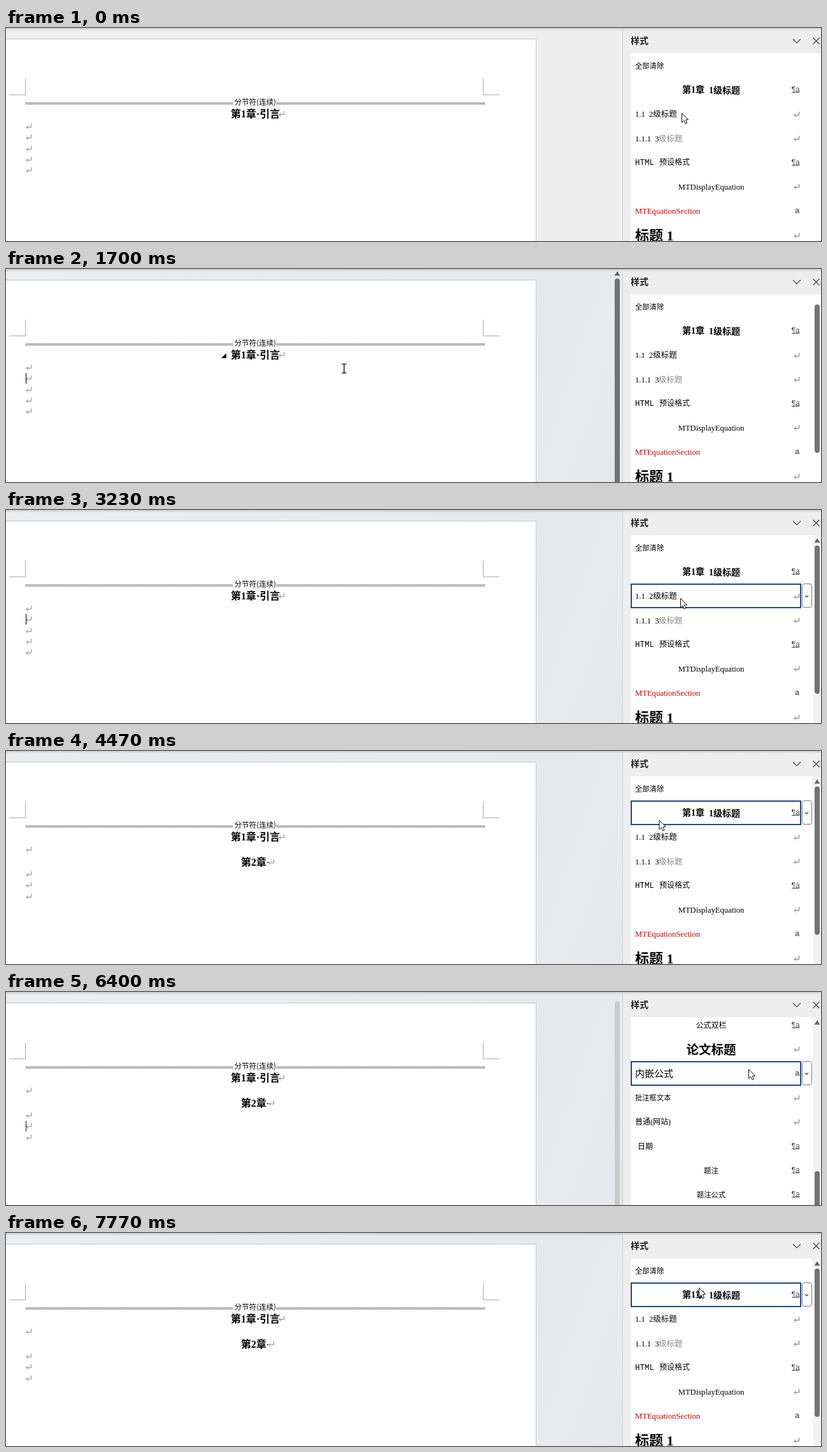
Write an HTML page with a canvas that moves like this. It is 1280 by 336 pixels and loops after 8 s.

```html
<!DOCTYPE html>
<html lang="zh">
<head>
<meta charset="utf-8">
<style>
html, body { margin: 0; width: 1280px; height: 336px; overflow: hidden; background: #eee; }
canvas { display: block; }
</style>
</head>
<body>
<canvas id="stage" width="1280" height="336"></canvas>
<script>
const g = document.getElementById('stage').getContext('2d');
const LOOP = 8000, ACTIVE = 700, APPLY = 4000, CLICK = 5570, JUMP = 5970;
const SERIF = '"Liberation Serif","Noto Sans CJK SC",serif';
const SANS = '"Liberation Sans","Noto Sans CJK SC",sans-serif';
const CJK = '"Noto Sans CJK SC",sans-serif';
const MONO = '"Liberation Mono",monospace';
const ROW = 38.2, FIRST = 59.4;

// Each key: time, then values.
const pointer = [
  [30, 1061, 134], [600, 530, 180], [830, 518, 190], [870, 518, 190], [1170, 505, 186],
  [1370, 505, 186], [1530, 1010, 170], [1700, 531, 157], [2000, 515, 166], [2200, 515, 166],
  [2900, 1085, 150], [3030, 1085, 150], [3230, 1059, 139], [3470, 1070, 100], [4370, 1070, 100],
  [4970, 481, 216], [6170, 481, 216], [6400, 1166, 121.5], [6800, 1117, 138.5], [7130, 1117, 138.5],
  [7770, 1088, 86]
];
const scrolling = [[6500, 542], [6970, 274], [7030, 274], [7130, 215], [7450, 0]];
const caretOn = [[700, 1100], [1600, 2300], [2650, 3400], [4000, 4480], [4700, 5260],
  [5590, 6230], [6330, 6700], [6980, 7300]];
const docHover = [[400, 1470], [1600, 2450], [4700, 6290]];
const paneHover = [[1460, 1615], [2450, 4640], [6290, 8400]];

// Style rows: text, size, marker, options.
const rows = [
  ['全部清除', 11.3, ''],
  ['', 14, 'pa'],
  ['1.1  2级标题', 12.5, 'ret'],
  ['', 12.5, 'ret'],
  ['', 12, 'pa'],
  ['MTDisplayEquation', 12.6, 'ret', { mid: 1 }],
  ['MTEquationSection', 12.6, 'a', { color: '#c80000' }],
  ['标题 1', 22, 'ret', { bold: 1 }],
  ['标题 2', 19.5, 'ret', { font: SANS }],
  ['标题 3', 20, 'ret', { bold: 1 }],
  ['标题 4', 17.6, 'ret', { font: SANS }],
  ['参考文献', 13, 'ret'],
  ['代码', 12, 'ret'],
  ['附录', 18, 'ret'],
  ['公式双栏', 12, 'pa', { mid: 1 }],
  ['论文标题', 19.5, 'ret', { mid: 1, bold: 1 }],
  ['内嵌公式', 15, 'a'],
  ['批注框文本', 11.3, 'ret'],
  ['普通(网站)', 12, 'ret'],
  ['日期', 12, 'pa', { x: 992 }],
  ['题注', 11.5, 'pa', { mid: 1 }],
  ['题注公式', 11.2, 'pa', { mid: 1 }],
  ['正文', 12, 'ret']
];

function at(keys, t) {
  if (t <= keys[0][0]) return keys[0].slice(1);
  for (let i = 1; i < keys.length; i++) {
    const a = keys[i - 1], b = keys[i];
    if (t < b[0]) {
      const u = (t - a[0]) / (b[0] - a[0]), e = u * u * (3 - 2 * u);
      return a.slice(1).map((v, k) => v + (b[k + 1] - v) * e);
    }
  }
  return keys[keys.length - 1].slice(1);
}

function rect(x, y, w, h, color) {
  g.fillStyle = color;
  g.fillRect(x, y, w, h);
}

function line(points, color, width = 1) {
  g.beginPath();
  points.forEach(([x, y]) => g.lineTo(x, y));
  g.strokeStyle = color;
  g.lineWidth = width;
  g.stroke();
}

function shape(points, fill, stroke) {
  g.beginPath();
  points.forEach(([x, y]) => g.lineTo(x, y));
  g.closePath();
  g.fillStyle = fill;
  g.fill();
  if (stroke) {
    g.strokeStyle = stroke;
    g.lineWidth = 1;
    g.stroke();
  }
}

function round(x, y, w, h, r) {
  g.beginPath();
  g.roundRect(x, y, w, h, r);
}

// y is the middle of the text line.
function text(s, x, y, size, { font = SERIF, color = '#000', bold, mid } = {}) {
  g.font = `${bold ? 700 : 500} ${size}px ${font}`;
  g.fillStyle = color;
  g.textAlign = mid ? 'center' : 'left';
  g.fillText(s, x, Math.round(y + size * 0.37));
}

function returnMark(x, y, color = '#888') {
  y = Math.round(y);
  line([[x + 8.5, y - 4], [x + 8.5, y + 1.5], [x + 1, y + 1.5]], color);
  line([[x + 4, y - 1.5], [x + 1, y + 1.5], [x + 4, y + 4.5]], color);
}

function backdrop(t) {
  rect(0, 0, 1280, 336, '#eee');
  if (t >= ACTIVE) {
    const fill = g.createLinearGradient(0, 0, 968, 336);
    fill.addColorStop(0, '#ebeef0');
    fill.addColorStop(0.8, '#e5e8ed');
    fill.addColorStop(0.9, '#e8eaef');
    fill.addColorStop(1, '#e4e7ed');
    rect(0, 0, 968, 336, fill);
  }
  const shade = g.createLinearGradient(0, 0, 0, 4);
  shade.addColorStop(0, 'rgba(0,0,0,.14)');
  shade.addColorStop(1, 'rgba(0,0,0,0)');
  rect(0, 0, 1280, 4, shade);
}

function page(t, px, py) {
  rect(0, 17, 833, 319, '#c9c9c9');
  rect(0, 18, 832, 318, '#fff');
  line([[30.5, 80], [30.5, 105.5], [5, 105.5]], '#aaa');
  line([[749.5, 80], [749.5, 105.5], [775, 105.5]], '#aaa');

  for (let x = 31; x < 752; x += 2) {
    if (x < 357 || x > 424) rect(x, 117, 1, 4, '#777');
  }
  text('分节符(连续)', 391.5, 116.5, 11.5, { font: CJK, mid: 1 });
  text('第1章·引言', 353, 135.5, 16, { bold: 1 });
  returnMark(428, 135);
  if (t > ACTIVE && px < 832 && py > 125 && py < 165) {
    shape([[338, 140.5], [346, 140.5], [346, 133]], '#000');
  }

  const applied = t >= APPLY;
  (applied ? [155, 194, 211, 229] : [155, 172, 190, 207, 224]).forEach(y => returnMark(31, y));
  if (applied) {
    text('第2章', 369, 175.5, 16, { bold: 1 });
    rect(410, 175, 2, 2, '#555');
    returnMark(412, 175);
  }

  const span = caretOn.find(([a, b]) => t >= a && t < b);
  if (span) {
    g.globalAlpha = Math.min(1, (t - span[0] + 20) / 100, (span[1] - t) / 100);
    const inHeading = applied && t < CLICK;
    rect(inHeading ? 412 : 31, t >= CLICK ? 203 : 164, 1, inHeading ? 22 : 17, '#000');
    g.globalAlpha = 1;
  }
}

function scrollbar(spans, t, x, top, height, arrowY) {
  const open = spans.some(([a, b]) => t >= a && t < b);
  const dark = spans.some(([a, b]) => t >= a && t < b + 90);
  const seen = spans.some(([a, b]) => t >= a && t < b + 400);
  if (!seen) return;
  round(x - 4, top, 8, height, 4);
  g.fillStyle = dark ? '#727272' : '#cacaca';
  g.fill();
  if (open) {
    shape([[x - 4.5, arrowY + 3.5], [x + 4.5, arrowY + 3.5], [x, arrowY - 3.5]], '#666');
  }
}

function marker(kind, y) {
  if (kind === 'ret') returnMark(1237, y, '#777');
  if (kind === 'a') text('a', 1239, y - 1, 13, { font: SANS, bold: 1, color: '#666' });
  if (kind === 'pa') {
    text('¶a', 1240, y - 1, 12, { font: SANS, mid: 1, color: '#555' });
    rect(1234, Math.round(y + 3.5), 12, 1, '#555');
  }
}

function styleRow(i, y) {
  const [label, size, mark, opt = {}] = rows[i];
  if (i === 1) {
    text('第1章', 1062, y - 0.5, size, { bold: 1 });
    text('1级标题', 1104, y + 0.5, size, { bold: 1 });
  } else if (i === 3) {
    text('1.1.1  3', 988, y, size);
    text('级标题', 1025, y, size, { color: '#888' });
  } else if (i === 4) {
    text('HTML', 988, y - 0.5, 12.5, { font: MONO });
    text('预设格式', 1026, y - 0.5, size);
  } else {
    text(label, opt.mid ? 1107.5 : opt.x || 988, y, size, opt);
  }
  marker(mark, y);
}

function pane(t, px, py) {
  rect(968, 0, 1, 336, '#d2d2d2');
  text('样式', 981, 20, 14, { font: CJK, bold: 1, color: '#222' });
  line([[1236, 17.5], [1242, 23.5], [1248, 17.5]], '#444', 1.2);
  line([[1267.5, 15.5], [1277.5, 25.5]], '#444', 1.2);
  line([[1277.5, 15.5], [1267.5, 25.5]], '#444', 1.2);
  rect(981, 40, 299, 296, '#fff');
  if (paneHover.some(([a, b]) => t >= a && t < b)) rect(1267, 40, 13, 296, '#f3f3f3');

  const scroll = t < JUMP ? 0 : at(scrolling, t)[0];
  const inList = t > ACTIVE && px > 981 && px < 1266 && py > 40;
  const hovered = inList ? Math.round((py + scroll - FIRST) / ROW) : -1;
  const chosen = t >= APPLY && t < JUMP ? 1 : -1;

  g.save();
  g.beginPath();
  g.rect(981, 40, 299, 296);
  g.clip();
  rows.forEach((_, i) => {
    const y = FIRST + i * ROW - scroll;
    if (y < 10 || y > 366) return;
    styleRow(i, y);
    if (i !== hovered && i !== chosen) return;
    const top = Math.round(y - 18.6);
    g.strokeStyle = '#254a80';
    g.lineWidth = 2;
    g.strokeRect(982, top, 266, 37);
    if (i === hovered) {
      round(1250.5, top - 0.5, 15, 37, 3);
      g.fillStyle = '#fff';
      g.fill();
      g.strokeStyle = '#777';
      g.lineWidth = 1;
      g.stroke();
      line([[1255, y - 1], [1257.5, y + 1.5], [1260, y - 1]], '#333', 1.2);
    }
  });
  g.restore();
  scrollbar(paneHover, t, 1274, 56 + scroll * 0.418, 234, 48);
}

function drawPointer(x, y) {
  if (x < 832) {
    line([[x, y - 7], [x, y + 7]], '#000', 1.3);
    for (const end of [-7, 7]) line([[x - 3.5, y + end], [x + 3.5, y + end]], '#000', 1.2);
    return;
  }
  const outline = [[0, 0], [0, 14.5], [3.3, 11.5], [5.6, 16.7], [8, 15.6], [5.8, 10.5], [10.2, 10.2]];
  shape(outline.map(([dx, dy]) => [x + dx + 0.5, y + dy + 0.5]), '#fff', '#111');
}

function draw(now) {
  const t = now % LOOP;
  const [px, py] = at(pointer, t);
  backdrop(t);
  page(t, px, py);
  scrollbar(docHover, t, 960, 15, 340, 7);
  pane(t, px, py);
  drawPointer(px, py);
}

const start = performance.now();
function tick() {
  draw(performance.now() - start);
  requestAnimationFrame(tick);
}
tick();
</script>
</body>
</html>
```
